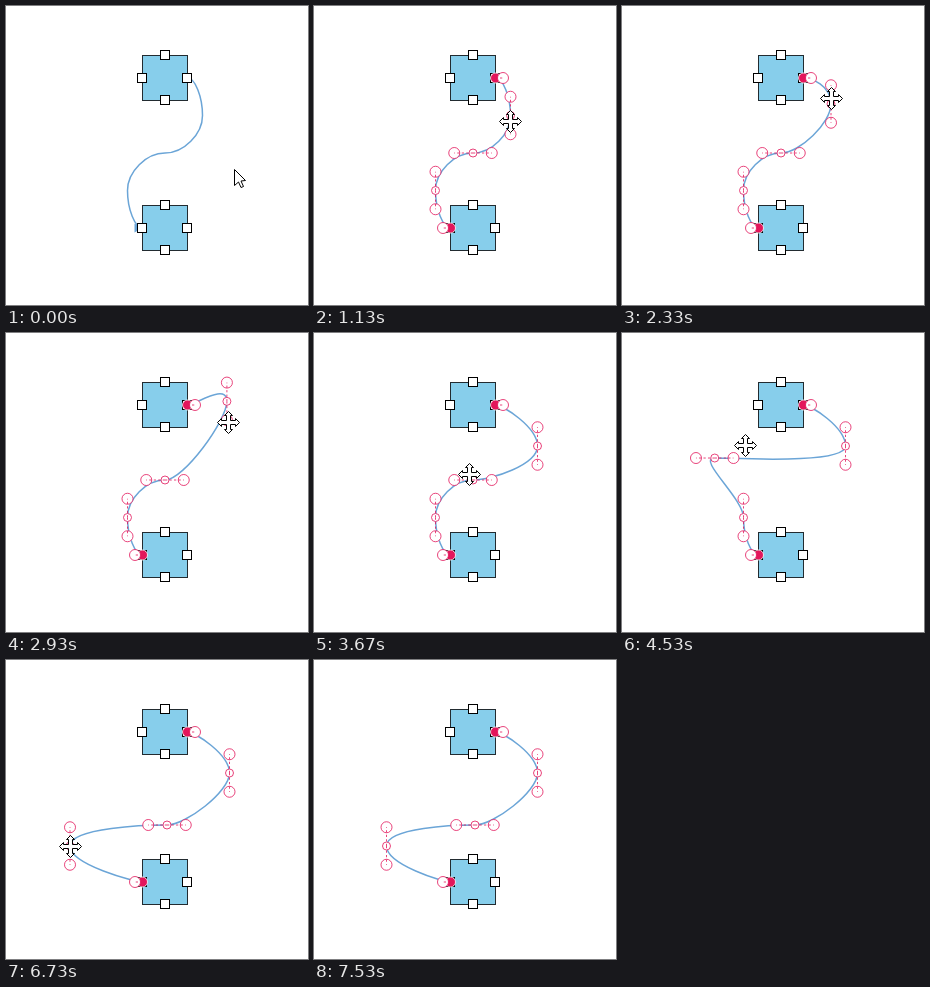
Recreate the animation shown at these times as an HTML page with a canvas. Size 302 by 299 pixels, loop 8000 ms.

```html
<!DOCTYPE html>
<html>
<head>
<meta charset="utf-8">
<title>Bezier connector editing</title>
<style>
html, body { margin: 0; width: 100%; height: 100%; overflow: hidden; background: #fff; }
canvas { display: block; }
</style>
</head>
<body>
<canvas id="stage" width="302" height="299"></canvas>
<script>
const ctx = document.getElementById('stage').getContext('2d');
const LOOP = 8000, FPS = 15;
const PINK = '#e3165b', BLUE = '#6ba5d7';
const SIZE = 45, PORT = 9, ARM = 18.75, HANDLE_R = 5.5, JOINT_R = 4;
const SELECT_TICK = 9, HIDE_TICK = 113, HOVER = 9;

const MID = [159, 147];
const START = [MID[0] + SIZE / 2, 72], END = [MID[0] - SIZE / 2, 222];
const START_HANDLE = [START[0] + 7.5, START[1]], END_HANDLE = [END[0] - 7.5, END[1]];

const joints = [
  { home: [MID[0] + 37.5, MID[1] - 37.5], dir: [0, 1] },
  { home: MID, dir: [-1, 0] },
  { home: [MID[0] - 37.5, MID[1] + 37.5], dir: [0, 1] }
];

// Pointer moves: eased arcs, timed in ticks; drag names the joint that is pulled.
const origin = [228, 163];
const moves = [
  { from: 0, until: 6, bend: [205, 150], to: [183, 138] },
  { from: 12, until: 17, bend: [190, 127], to: [196.5, 115.5] },
  { from: 20, until: 29, bend: [353, 163], to: [209, 98], drag: 0 },
  { from: 34, until: 46, bend: [215, -55], to: [223.5, 113], drag: 0 },
  { from: 47, until: 55, bend: [185, 209], to: [155.5, 141.5] },
  { from: 60, until: 70, bend: [-38, 170], to: [160, 99], drag: 1 },
  { from: 72, until: 79, bend: [175, 172], to: [161, 165], drag: 1 },
  { from: 81, until: 93, bend: [141, 221], to: [121.5, 184.5] },
  { from: 97, until: 100, bend: [95, 131], to: [64, 186], drag: 2 },
  { from: 103, until: 109, bend: [68, 52], to: [72.5, 186], drag: 2 },
  { from: 111, until: 112, bend: [73, 220], to: [74, 255] }
];

function pointerAt(tick) {
  const i = moves.findLastIndex(m => m.from <= tick);
  const { from, until, bend, to } = moves[i];
  const start = i ? moves[i - 1].to : origin;
  const k = Math.min(1, (tick - from) / (until - from));
  const t = k * k * (3 - 2 * k), u = 1 - t;
  return start.map((s, a) => u * u * s + 2 * u * t * bend[a] + t * t * to[a]);
}

// A dragged joint trails the pointer by one tick.
function jointAt({ home, dir }, index, tick) {
  const move = moves.findLast(m => m.drag === index && m.from < tick);
  const p = move ? pointerAt(Math.min(tick - 1, move.until)) : home;
  const offset = side => p.map((v, a) => v + dir[a] * ARM * side);
  return { p, before: offset(-1), after: offset(1) };
}

function polygon(points, fill, stroke) {
  ctx.beginPath();
  points.forEach(p => ctx.lineTo(...p));
  ctx.closePath();
  ctx.fillStyle = fill;
  ctx.fill();
  if (stroke) {
    ctx.strokeStyle = stroke;
    ctx.stroke();
  }
}

function box(cx, cy, size, fill, stroke) {
  const [x, y] = [cx, cy].map(v => Math.ceil(v - size / 2) - 0.5);
  ctx.fillStyle = fill;
  ctx.strokeStyle = stroke;
  ctx.fillRect(x, y, size, size);
  ctx.strokeRect(x, y, size, size);
}

function circle([x, y], r, fill, stroke) {
  ctx.beginPath();
  ctx.arc(x, y, r, 0, Math.PI * 2);
  ctx.fillStyle = fill;
  ctx.strokeStyle = stroke;
  ctx.fill();
  ctx.stroke();
}

function drawNode(y) {
  const x = MID[0], half = SIZE / 2;
  box(x, y, SIZE, '#87ceeb', '#222b30');
  for (const [dx, dy] of [[-half, 0], [half, 0], [0, -half], [0, half]])
    box(x + dx, y + dy, PORT, '#fff', '#000');
}

function drawConnector(knots) {
  let leave = START_HANDLE;
  ctx.beginPath();
  ctx.moveTo(...START);
  for (const { p, before, after } of knots) {
    ctx.bezierCurveTo(...leave, ...before, ...p);
    leave = after;
  }
  ctx.bezierCurveTo(...leave, ...END_HANDLE, ...END);
  ctx.strokeStyle = BLUE;
  ctx.lineWidth = 1.5;
  ctx.stroke();
  ctx.lineWidth = 1;
  polygon([[128.5, 217.5], END, [128.5, 226.5]], BLUE);
}

function drawHandles(knots) {
  ctx.lineWidth = 0.8;
  for (const end of [START, END]) circle(end, 5, PINK, '#fff');
  for (const handle of [START_HANDLE, END_HANDLE]) circle(handle, HANDLE_R, '#fff', PINK);
  const guides = [[START, START_HANDLE], [END, END_HANDLE]];
  for (const { p, before, after } of knots) {
    circle(before, HANDLE_R, '#fff', PINK);
    circle(after, HANDLE_R, '#fff', PINK);
    circle(p, JOINT_R, '#fff', PINK);
    guides.push([p, before], [p, after]);
  }
  ctx.setLineDash([2.25, 2.25]);
  ctx.beginPath();
  for (const [a, b] of guides) {
    ctx.moveTo(...a);
    ctx.lineTo(...b);
  }
  ctx.stroke();
  ctx.setLineDash([]);
  ctx.lineWidth = 1;
}

function drawPointer(tick, knots) {
  const [x, y] = pointerAt(tick);
  const dragging = moves.some(m => m.drag >= 0 && tick >= m.from && tick <= m.until + 1);
  const hovering = knots.some(({ p }) => Math.hypot(p[0] - x, p[1] - y) < HOVER);
  ctx.save();
  ctx.translate(Math.floor(x) + 0.5, Math.floor(y) + 0.5);
  if (tick > SELECT_TICK && (dragging || hovering)) {
    const arm = [[-2, -2], [-2, -7], [-4, -7], [0, -11], [4, -7], [2, -7]];
    const cross = [];
    for (let turn = 0; turn < 4; turn++) {
      cross.push(...arm);
      arm.forEach((p, i) => arm[i] = [-p[1], p[0]]);
    }
    polygon(cross, '#fff', '#000');
  } else {
    polygon([[0, 0], [0, 16], [4, 12.5], [6.5, 18], [9, 17], [6.5, 11.5], [11, 11]], '#fff', '#000');
  }
  ctx.restore();
}

function render() {
  const tick = Math.floor((performance.now() + 5) % LOOP * FPS / 1000);
  const knots = joints.map((joint, i) => jointAt(joint, i, tick));
  ctx.fillStyle = '#fff';
  ctx.fillRect(0, 0, 302, 299);
  drawConnector(knots);
  drawNode(START[1]);
  drawNode(END[1]);
  if (tick >= SELECT_TICK) drawHandles(knots);
  if (tick < HIDE_TICK) drawPointer(tick, knots);
  requestAnimationFrame(render);
}
render();
</script>
</body>
</html>
```
